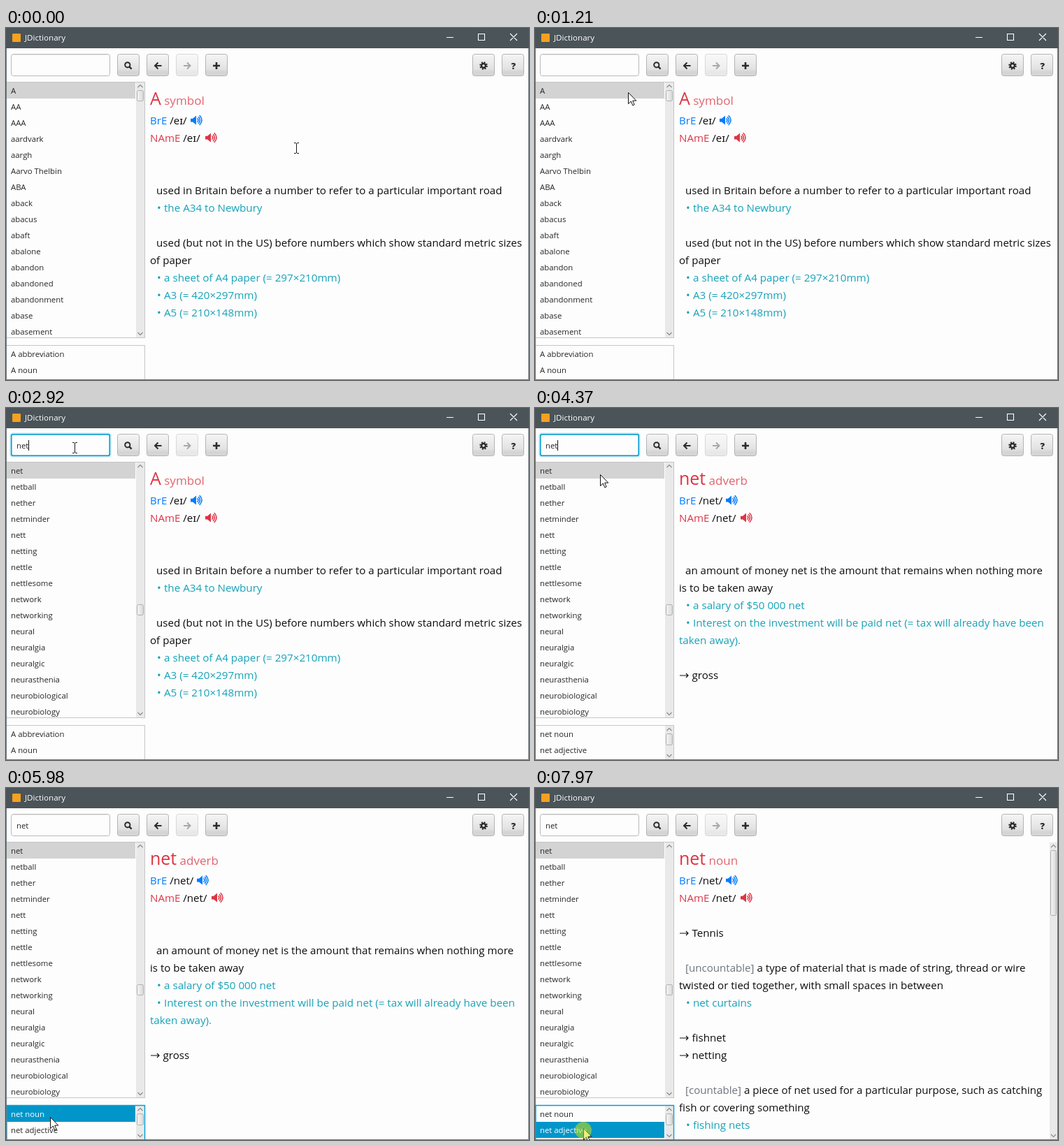
Animation of 748 by 504 pixels, one loop 8 s. Source, as an HTML page:

```html
<!DOCTYPE html>
<html lang="en">
<head>
<meta charset="utf-8">
<title>JDictionary</title>
<style>
  html, body { margin: 0; width: 100%; height: 100%; overflow: hidden; background: #fdfdfd; }
  svg { display: block; }
  text { font-family: "Open Sans", "Noto Sans", sans-serif; white-space: pre; }
  .ui { font-size: 11.35px; fill: #262626; }
  .body { font-size: 15.1px; fill: #0c0c0c; }
  .head { font-size: 25px; fill: #dc3545; }
  .kind { font-size: 17px; fill: #e2636f; }
  .blue { fill: #007bff; }
  .red { fill: #dc3545; }
  .gray { fill: #6c757d; }
  .teal { font-size: 15.2px; fill: #17a2b8; }
</style>
</head>
<body>
<svg id="stage" width="748" height="504" viewBox="0 0 748 504">
  <defs>
    <linearGradient id="face" x2="0" y2="1">
      <stop offset="0" stop-color="#f5f5f5"/>
      <stop offset=".68" stop-color="#e2e2e2"/>
      <stop offset=".82" stop-color="#d4d4d4"/>
      <stop offset="1" stop-color="#d6d6d6"/>
    </linearGradient>
    <linearGradient id="thumb">
      <stop offset="0" stop-color="#f4f4f4"/>
      <stop offset="1" stop-color="#dadada"/>
    </linearGradient>
    <g id="speaker">
      <path d="M0 4.8H3L8 .4V13.6L3 9.4H0Z"/>
      <path d="M9.9 4.8Q12 7 9.9 9.2M11.5 2.6Q15.4 7 11.5 11.4M13.1 .6Q19 7 13.1 13.4" fill="none" stroke="currentColor" stroke-width="1.5" stroke-linecap="round"/>
    </g>
  </defs>
  <rect width="748" height="504" fill="#fdfdfd"/>
  <rect width="748" height="29" fill="#4a5459"/>
  <rect x="9" y="8" width="12" height="12" rx="1" fill="#f5a11f"/>
  <text x="27" y="18" font-size="11.6" fill="#fff">JDictionary</text>
  <path d="M630 13.5H640M675.5 8.5H684.5V17.5H675.5ZM721 8L731 18M731 8L721 18" fill="none" stroke="#fff" stroke-width="1.1"/>
  <g id="buttons"></g>
  <g fill="none" stroke="#2b2b2b" stroke-width="2">
    <circle cx="173.8" cy="52.8" r="3.6"/>
    <path d="M176.6 55.6L179.6 58.6" stroke-width="2.4"/>
    <path d="M222.5 54H213M217.5 49.5L213 54L217.5 58.5"/>
    <path d="M254 54H263.5M259 49.5L263.5 54L259 58.5" stroke="#a9a9a9"/>
    <path d="M296 54H306M301 49V59" stroke-width="2.6"/>
    <circle cx="683" cy="54" r="3" stroke-width="2.4"/>
    <circle cx="683" cy="54" r="4.8" stroke-dasharray="2 1.77"/>
  </g>
  <text x="722.5" y="58.5" font-size="13" font-weight="800" fill="#2b2b2b">?</text>

  <rect x="7.5" y="37.5" width="141" height="31" rx="3" fill="#fdfdfd" stroke="#b9b9b9"/>
  <path d="M9 38.5H147" stroke="#e6e6e6"/>
  <g id="ring" fill="none" stroke="#039ed3">
    <rect x="7" y="37" width="142" height="32" rx="3" stroke-width="3.6" opacity=".22"/>
    <rect x="7.7" y="37.7" width="140.6" height="30.6" rx="2.5" stroke-width="1.5"/>
  </g>
  <text id="query" class="ui" x="15" y="58"></text>
  <rect id="caret" y="46" width="1" height="15" fill="#111"/>

  <rect x=".5" y="77.5" width="198" height="366" fill="#fdfdfd" stroke="#c6c6c6"/>
  <rect x="1" y="78" width="184" height="23" fill="#d3d3d3"/>
  <g id="words"></g>

  <rect x=".5" y="454.5" width="198" height="52" fill="#fdfdfd" stroke="#c6c6c6"/>
  <rect id="pick" x="1" width="184" height="23" fill="#0096c9"/>
  <g id="forms"></g>
  <path id="formRing" d="M1 504V454.5H198.5V504" fill="none" stroke="#039ed3" stroke-width="1.4"/>

  <g id="pages"></g>
  <path d="M.5 29V503.5H747.5V29" fill="none" stroke="#6d7579"/>
  <g id="arrow"><path d="M.5 .5V16.6L4.3 13L6.8 18.8L9.2 17.8L6.7 12.1H11.8Z" fill="#fff" stroke="#111"/></g>
  <path id="beam" d="M-3-7.5H-1L.5-6.5L2-7.5H4M.5-6.5V6.5M-3 7.5H-1L.5 6.5L2 7.5H4" fill="none" stroke="#1a1a1a"/>
  <circle id="press" r="12" fill="#d6e200" opacity=".52"/>
</svg>
<script>
const LOOP = 8000;
const $ = id => document.getElementById(id);

function add(parent, tag, attrs = {}, content) {
  const node = document.createElementNS('http://www.w3.org/2000/svg', tag);
  for (const key in attrs) node.setAttribute(key, attrs[key]);
  if (content !== undefined) node.textContent = content;
  parent.append(node);
  return node;
}
const show = (node, on) => node.setAttribute('visibility', on ? 'inherit' : 'hidden');
const label = (parent, x, y, cls, str) => add(parent, 'text', { x, y, class: cls }, str);

function scrollbar(parent, x, top, bottom, w, thumbTop, thumbH) {
  const mid = x + w / 2;
  add(parent, 'rect', { x, y: top, width: w, height: bottom - top, fill: '#e9e9e9' });
  add(parent, 'path', {
    d: `M${mid - 3.5} ${top + 7}l3.5-3.5l3.5 3.5M${mid - 3.5} ${bottom - 7}l3.5 3.5l3.5-3.5`,
    fill: 'none', stroke: '#8a8a8a', 'stroke-width': 1.2
  });
  return add(parent, 'rect', {
    x: x + 1.5, y: thumbTop + .5, width: w - 3, height: thumbH, rx: 2,
    fill: 'url(#thumb)', stroke: '#b0b0b0'
  });
}

for (const x of [159, 201, 243, 285, 667, 709])
  add($('buttons'), 'rect', {
    x: x + .5, y: 37.5, width: 31, height: 31, rx: 3, fill: 'url(#face)',
    stroke: '#b4b4b4', opacity: x === 243 ? .5 : 1
  });

// Word list, one group per query
const lists = [
  'A,AA,AAA,aardvark,aargh,Aarvo Thelbin,ABA,aback,abacus,abaft,abalone,abandon,abandoned,abandonment,abase,abasement',
  'n,naan,nab,nacelle,nacho,nadir,naff,nag,nail,naive,naked,name,nameless,namely,nanny,nap',
  'neap tide,near,nearby,nearly,neat,neatly,nebula,nebulous,necessary,necessity,neck,necklace,nectar,need,needle,needy',
  'net,netball,nether,netminder,nett,netting,nettle,nettlesome,network,networking,neural,neuralgia,neuralgic,neurasthenia,neurobiological,neurobiology'
].map(words => {
  const g = add($('words'), 'g');
  words.split(',').forEach((word, i) => label(g, 7, 94 + 23 * i, 'ui', word));
  return g;
});
const listThumb = scrollbar($('words'), 186, 78, 443, 12, 89, 15);
const thumbTops = [89.5, 280.5, 284.5, 281.5];

// Word forms
const forms = [['A abbreviation', 'A noun'], ['net noun', 'net adjective']].map((pair, n) => {
  const g = add($('forms'), 'g');
  if (n) scrollbar(g, 186, 455, 503, 12, 466, 16);
  const rows = pair.map((str, i) => label(g, 7, 471 + 23 * i, 'ui', str));
  return { g, rows };
});

// Articles: row number, kind of line, text
function page(word, kind, sound, iconX, lines) {
  const g = add($('pages'), 'g');
  const title = label(g, 206, 110, 'head', word);
  add(title, 'tspan', { class: 'kind' }, ' ' + kind);
  [['BrE', 'blue', '#007bff'], ['NAmE', 'red', '#dc3545']].forEach(([name, cls, color], i) => {
    const line = label(g, 206, 138 + 25 * i, 'body', '');
    add(line, 'tspan', { class: cls }, name);
    add(line, 'tspan', {}, ` ${sound}`);
    add(g, 'use', { href: '#speaker', x: iconX + 21 * i, y: 125 + 25 * i, fill: color, color });
  });
  for (const [row, type, str] of lines) {
    const y = 138 + 25 * row;
    const x = { text: 206, cont: 206, sense: 215, item: 226, link: 224.5 }[type];
    const teal = type === 'item' || type === 'cont' ? ' teal' : '';
    if (type === 'item') label(g, 216, y, 'body teal', '•');
    if (type === 'link')
      add(g, 'path', { d: `M207 ${y - 5}h12M216 ${y - 8}l3 3l-3 3`, fill: 'none', stroke: '#111', 'stroke-width': 1.2 });
    const [, tag, rest] = str.match(/^(\[\w+\])?(.*)$/);
    const line = label(g, x, y, 'body' + teal, '');
    if (tag) add(line, 'tspan', { class: 'gray' }, tag);
    add(line, 'tspan', {}, rest);
  }
  return g;
}
const pages = [
  page('A', 'symbol', '/eɪ/', 264, [
    [4, 'sense', 'used in Britain before a number to refer to a particular important road'],
    [5, 'item', 'the A34 to Newbury'],
    [7, 'sense', 'used (but not in the US) before numbers which show standard metric sizes'],
    [8, 'text', 'of paper'],
    [9, 'item', 'a sheet of A4 paper (= 297×210mm)'],
    [10, 'item', 'A3 (= 420×297mm)'],
    [11, 'item', 'A5 (= 210×148mm)']
  ]),
  page('net', 'adverb', '/net/', 273, [
    [4, 'sense', 'an amount of money net is the amount that remains when nothing more'],
    [5, 'text', 'is to be taken away'],
    [6, 'item', 'a salary of $50 000 net'],
    [7, 'item', 'Interest on the investment will be paid net (= tax will already have been'],
    [8, 'cont', 'taken away).'],
    [10, 'link', 'gross']
  ]),
  page('net', 'noun', '/net/', 273, [
    [3, 'link', 'Tennis'],
    [5, 'sense', '[uncountable] a type of material that is made of string, thread or wire'],
    [6, 'text', 'twisted or tied together, with small spaces in between'],
    [7, 'item', 'net curtains'],
    [9, 'link', 'fishnet'],
    [10, 'link', 'netting'],
    [12, 'sense', '[countable] a piece of net used for a particular purpose, such as catching'],
    [13, 'text', 'fish or covering something'],
    [14, 'item', 'fishing nets']
  ])
];
scrollbar(pages[2], 736, 78, 503, 11, 89, 93);

// Timeline: [start ms, value]
const steps = {
  query: [[0, ''], [2440, 'n'], [2580, 'ne'], [2830, 'net']],
  list: [[0, 0], [2580, 1], [2740, 2], [2920, 3]],
  page: [[0, 0], [3260, 1], [6150, 2]],
  forms: [[0, 0], [3260, 1]],
  focus: [[0, 0], [1550, 1], [5790, 0]],
  caret: [[0, 0], [1550, 1], [2200, 0], [2440, 1], [3750, 0], [4240, 1], [4740, 0], [5320, 1], [5790, 0]],
  pick: [[0, -1], [5790, 0], [7890, 1]],
  press: [[0, 0], [1490, 1], [1710, 0], [5760, 1], [5980, 0], [7820, 1]]
};
const path = [
  [0, 415, 172], [680, 415, 172], [790, 393, 168], [900, 322, 154], [1010, 232, 135], [1110, 165, 114],
  [1210, 133, 92], [1330, 108, 68], [1460, 98, 57],
  [4240, 98, 57], [4370, 93, 94], [4560, 92, 190], [4800, 88, 370], [4940, 75, 450], [5040, 65, 470],
  [5110, 63, 476], [5320, 63, 476], [5400, 63, 471],
  [6600, 63, 471], [6640, 63, 463], [7070, 63, 463], [7090, 63, 467], [7300, 66, 480], [7480, 69, 487], [LOOP, 69, 487]
];

const at = (table, t) => table.findLast(step => step[0] <= t)[1];
function cursorAt(t) {
  const i = path.findIndex(p => p[0] > t);
  const a = path[i - 1], b = path[i];
  const k = (t - a[0]) / (b[0] - a[0]);
  return [1, 2].map(n => Math.round(a[n] + (b[n] - a[n]) * k));
}

function draw(t) {
  const s = {};
  for (const key in steps) s[key] = at(steps[key], t);

  if ($('query').textContent !== s.query) $('query').textContent = s.query;
  const width = s.query ? $('query').getComputedTextLength() : 0;
  $('caret').setAttribute('x', Math.round(15 + width));
  show($('caret'), s.caret);
  show($('ring'), s.focus);

  lists.forEach((g, i) => show(g, i === s.list));
  listThumb.setAttribute('y', thumbTops[s.list]);
  pages.forEach((g, i) => show(g, i === s.page));

  forms.forEach(({ g, rows }, i) => {
    show(g, i === s.forms);
    rows.forEach((row, n) => row.style.fill = n === s.pick ? '#fff' : '');
  });
  show($('formRing'), s.pick >= 0);
  show($('pick'), s.pick >= 0);
  $('pick').setAttribute('y', 455 + 23 * Math.max(0, s.pick));

  const [x, y] = cursorAt(t);
  const beam = x > 200 || (y > 37 && y < 69 && x < 149);
  for (const id of ['arrow', 'beam']) $(id).setAttribute('transform', `translate(${x} ${y})`);
  show($('beam'), beam);
  show($('arrow'), !beam);
  $('press').setAttribute('transform', `translate(${x} ${y + (beam ? 0 : 3)})`);
  show($('press'), s.press);
}

function tick() {
  draw(performance.now() % LOOP);
  requestAnimationFrame(tick);
}
tick();
</script>
</body>
</html>
```
